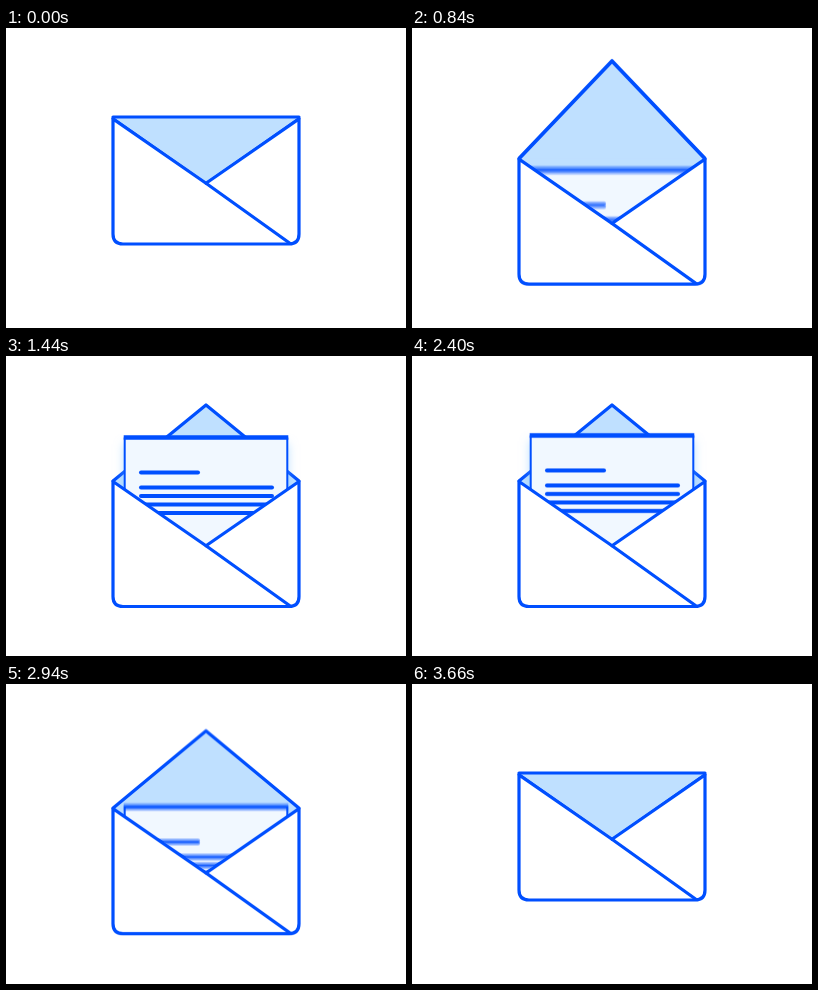
Write an HTML page with a canvas that moves like this. It is 400 by 300 pixels and loops after 4140 ms.

```html
<!DOCTYPE html>
<html lang="en">
<head>
<meta charset="utf-8">
<title>Envelope</title>
<style>
  html, body { margin: 0; width: 100%; height: 100%; overflow: hidden; background: #fff; }
  canvas { display: block; width: 400px; height: 300px; }
</style>
</head>
<body>
<canvas id="stage" width="400" height="300"></canvas>
<script>
const LOOP = 4140, STEP = 30, CLOSE_FROM = 1900;
const OPEN_MS = 1140, CLOSE_MS = 1170;
const SHUTTER = 9, SAMPLES = 8;
const BLUE = '#004fff', SKY = '#bfe0ff', PAPER = '#f1f8ff';

const stage = document.getElementById('stage').getContext('2d');
const layer = document.createElement('canvas');
layer.width = 400;
layer.height = 300;
const ctx = layer.getContext('2d');

const bezier = (s, a, b) => 3 * a * s * (1 - s) ** 2 + 3 * b * s * s * (1 - s) + s ** 3;

// Symmetric ease that swings past both ends.
function ease(x) {
  if (x <= 0) return 0;
  if (x >= 1) return 1;
  let lo = 0, hi = 1;
  for (let i = 0; i < 24; i++) {
    const mid = (lo + hi) / 2;
    if (bezier(mid, 0.7, 0.3) < x) lo = mid; else hi = mid;
  }
  return bezier(lo, -0.9, 1.9);
}

function progress(t, openAt, closeAt) {
  return t < CLOSE_FROM
    ? ease((t - openAt) / OPEN_MS)
    : 1 - ease((t - closeAt) / CLOSE_MS);
}

function polyline(points, close) {
  ctx.beginPath();
  points.forEach(([x, y]) => ctx.lineTo(x, y));
  if (close) ctx.closePath();
}

function line(x1, y1, x2, y2, width) {
  ctx.lineWidth = width;
  polyline([[x1, y1], [x2, y2]]);
  ctx.stroke();
}

function drawFlap(scale) {
  ctx.save();
  ctx.translate(0, 90.5);
  ctx.scale(1, scale);
  polyline([[107, 0], [200, 76], [293, 0]]);
  ctx.fill();
  ctx.lineWidth = 3.2;
  ctx.stroke();
  ctx.restore();
}

function drawLetter(top) {
  ctx.save();
  ctx.beginPath();
  ctx.rect(0, -100, 400, 300);
  ctx.clip();
  ctx.translate(0, top);

  ctx.save();
  ctx.fillStyle = PAPER;
  ctx.shadowColor = 'rgba(120, 195, 255, 0.5)';
  ctx.shadowBlur = 9;
  ctx.shadowOffsetY = 5;
  ctx.fillRect(118, 0, 164, 150);
  ctx.restore();

  ctx.lineCap = 'butt';
  line(118.7, 0, 118.7, 150, 2);
  line(281.3, 0, 281.3, 150, 2);
  line(117.7, 0, 282.3, 0, 4.6);
  ctx.lineCap = 'round';
  line(135, 35, 192, 35, 4);
  for (let i = 0; i < 4; i++) line(135, 50 + i * 8.5, 266, 50 + i * 8.5, 4);
  ctx.restore();
}

function drawFront() {
  ctx.beginPath();
  ctx.moveTo(107, 91);
  ctx.lineTo(107, 206);
  ctx.quadraticCurveTo(107, 216, 117, 216);
  ctx.lineTo(283, 216);
  ctx.quadraticCurveTo(293, 216, 293, 206);
  ctx.lineTo(293, 91);
  ctx.lineTo(200, 155.3);
  ctx.closePath();
  ctx.fillStyle = '#fff';
  ctx.fill();
  ctx.lineWidth = 3.2;
  ctx.stroke();
  line(200, 155.3, 283.5, 215, 3.2);
}

function drawScene(t) {
  const drop = 34.5 * progress(t, 37, 2467);
  const flap = 0.86 - 1.86 * progress(t, 52, 2480);
  const letterTop = 171 - 124 * progress(t, 260, 2385);

  ctx.fillStyle = '#fff';
  ctx.fillRect(0, 0, 400, 300);
  ctx.save();
  ctx.translate(0, drop);
  ctx.strokeStyle = BLUE;
  ctx.lineJoin = ctx.lineCap = 'round';
  ctx.fillStyle = SKY;
  polyline([[107, 90], [293, 90], [200, 155.3]], true);
  ctx.fill();
  if (flap <= 0) {
    drawFlap(flap);
    drawLetter(letterTop);
  } else {
    drawLetter(letterTop);
    drawFlap(flap);
  }
  drawFront();
  if (flap > 0) {
    line(107, 89, 293, 89, 3.2);
  }
  ctx.restore();
}

// Averages several moments within the shutter time for motion blur.
function render(t) {
  for (let i = 0; i < SAMPLES; i++) {
    drawScene(t + SHUTTER * ((i + 0.5) / SAMPLES - 0.5));
    stage.globalAlpha = 1 / (i + 1);
    stage.drawImage(layer, 0, 0);
  }
}

const start = performance.now();
function tick() {
  const t = Math.max(0, performance.now() - start) % LOOP;
  render(Math.floor(t / STEP) * STEP);
  requestAnimationFrame(tick);
}
tick();
</script>
</body>
</html>
```
